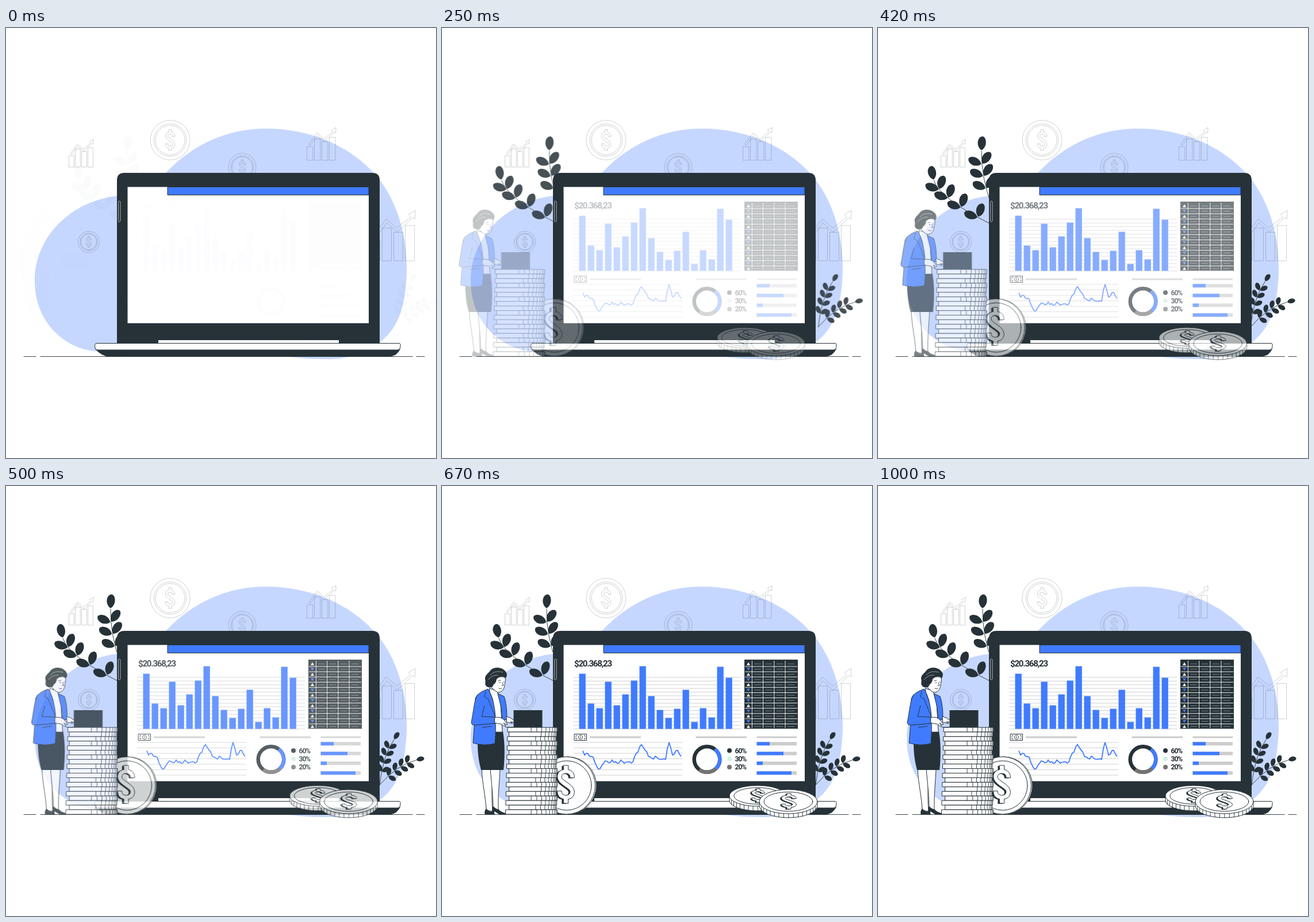
An HTML page that plays this animation: 748x748 px, repeating every 1040 ms.

```html
<!DOCTYPE html>
<html lang="en">
<head>
<meta charset="utf-8">
<title>Finance dashboard</title>
<style>
html, body { margin: 0; width: 100%; height: 100%; overflow: hidden; background: #fff; }
svg { display: block; width: 100%; height: 100%; }
text { font-family: Roboto, "Liberation Sans", sans-serif; font-weight: 700; fill: #263238; }
.dark { fill: #263238; }
.blue { fill: #407bff; }
.line { fill: #fff; stroke: #263238; stroke-width: 1; stroke-linejoin: round; stroke-linecap: round; }
.cloth { fill: #407bff; stroke: #263238; stroke-width: 1; stroke-linejoin: round; }
.thin { fill: none; stroke: #263238; stroke-width: .9; stroke-linecap: round; }
.grid { fill: none; stroke: #c4c4c4; stroke-width: .8; }
#icons { fill: none; stroke: #263238; stroke-opacity: .28; stroke-width: .8; }
#plants, #panel, #front { opacity: 0; }
#sign, #chart { vector-effect: non-scaling-stroke; }
</style>
</head>
<body>
<svg viewBox="0 0 748 748">
  <defs>
    <path id="sign" d="M-2.5-20H2.5V-15.5C7-14.5 9-11.5 9-7H4.5C4.5-10 3-11.5 0-11.5C-3-11.5-4.5-10-4.5-7.5C-4.5-4 9 0 9 8C9 12 6.5 15 2.5 15.5V20H-2.5V15.5C-7 14.5-9 11.5-9 7H-4.5C-4.5 10-3 11.5 0 11.5C3 11.5 4.5 10 4.5 7.5C4.5 4-9 0-9-8C-9-12-6.5-15-2.5-15.5Z"/>
    <path id="leaf" d="M0-.06C-.2-.16-.33-.44-.29-.7C-.25-.93-.1-1.06 .05-1.06C.23-1.02 .33-.76 .28-.48C.24-.28 .12-.14 0-.06Z"/>
    <path id="chart" d="M0 0V-1.8H.8V0ZM1 0V-2.85H1.8V0ZM2 0V-2.48H2.8V0ZM3 0V-3.07H3.8V0ZM.25-2.15L1.35-3.65L2.27-2.85L3.45-3.8L3.3-4.05L3.88-4.38L3.85-3.65L3.65-3.75L2.3-2.5L1.4-3.3L.4-1.95Z"/>
  </defs>

  <path fill="#c6d7ff" d="M452 175C530 175 600 205 646 259C685 307 698 370 697 425C695 480 685 520 650 547C625 567 595 576 560 576C500 576 450 566 380 562C300 556 230 564 165 563C106 562 50 515 50 440C50 365 110 302 193 292C230 287 250 275 278 252C325 202 385 175 452 175Z"/>
  <g id="icons"></g>
  <path class="thin" d="M31 571.5H52M60 571.5H707M714 571.5H728"/>
  <g id="plants" class="dark"></g>

  <g id="laptop">
    <path class="dark" d="M193 549V265Q193 252 206 252H637Q650 252 650 265V549Z"/>
    <path fill="#fff" d="M211.500 276.500H631V513.500H211.500ZM265 543H579V548.500H265Z"/>
    <path class="cloth" d="M281 276.500H631V290.500H281Z"/>
    <rect x="195.500" y="301" width="3.500" height="36" rx="1.700" fill="none" stroke="#ccc" stroke-width=".8"/>
    <path class="dark" d="M155 558H686Q681 570 667 572H180Q166 571 155 558Z"/>
    <path class="line" d="M157 548.500H684Q686.500 548.500 686 553Q686 560 681 560H160Q154.500 560 154.500 553Q154.500 548.500 157 548.500Z"/>
  </g>

  <g id="panel">
    <text x="230" y="313.500" font-size="15" letter-spacing="-1.200">$20.368,23</text>
    <g id="bars"></g>
    <g id="table"></g>
    <g id="trend"></g>
    <g fill="none" stroke-width="6.500">
      <circle cx="461" cy="475.500" r="22.300" stroke="#263238"/>
      <path stroke="#407bff" d="M474.500 457.800A22.300 22.300 0 0 1 476 492"/>
      <path stroke="#737373" d="M476 492A22.300 22.300 0 0 1 447.500 493.300"/>
    </g>
    <g id="legend" font-size="12"></g>
    <g id="progress"></g>
    <path class="line" d="M230.500 431.500H251.500V442.500H230.500Z"/>
    <path class="thin" d="M233 436V434H235M247 434H249V436M249 438V440H247M235 440H233V438M241 435.500V438.500"/>
    <ellipse class="thin" cx="241" cy="437" rx="3.500" ry="3.800"/>
    <path stroke="#ccc" stroke-width="2.800" d="M257 437H346M441.500 437H530M547.500 437H617"/>
  </g>

  <g id="front">
    <g id="bigCoin"></g>
    <g id="stack"></g>
    <g id="flatCoins"></g>
    <g id="woman">
      <path class="line" d="M69 492C70 518 76 540 77 564L88 566C86 542 87 518 89 492Z"/>
      <path class="line" d="M84 492C86 518 89 540 89 562L98 564C97 542 100 515 101 492Z"/>
      <path class="dark" d="M74.500 571.500Q73 565 77 561Q83 568 87 566L93 571.500ZM87.500 571.500Q86 562 89 557Q95 563 98 562Q102 567 110 569V571.500H100L91 566V571.500Z"/>
      <path class="dark" d="M62 448L90 427H106C110 450 109 475 107 494H68C64 480 62 465 62 448Z"/>
      <path class="line" d="M83 352L96 357L102 378L105 428H88Z"/>
      <path class="cloth" d="M97 361L108 366C112 377 113 392 113 406L105 407Q104 384 97 361Z"/>
      <path class="cloth" d="M80 353C70 357 61 361 58 370L56 420L54 447Q72 453 92 448C94 430 93 410 93 403C92 385 88 365 80 353Z"/>
      <path class="cloth" d="M62 363C56 372 55 391 51 411Q51 416 57 416L92 413V402L69 401L74 382"/>
      <path class="thin" d="M76 357L74 367L80 370L92 400M89 374L84 361M70 420L86 418"/>
      <path class="line" d="M92 403C99 401 104 403 108 407L114 415Q111 416 107 412L111 418Q108 419 103 414Q98 414 92 412Z"/>
      <path class="line" d="M112 401Q119 402 126 408L127 411L119 410L123 413L113 411Z"/>
      <path class="line" d="M86 332H110C111 339 109 344 109 347C108 353 105 358 99 359C94 359 90 354 87 351Z"/>
      <path class="dark" d="M80 350C72 346 77 341 75 336C74 329 81 326 84 321C90 314 103 315 109 321C115 326 113 332 110 335C106 328 99 332 95 336Q94 343 90 345Q88 352 80 350Z"/>
      <path class="thin" d="M100 342H102M107 341H108M105 342L107 347H104M99 352Q102 354 104 352M98 339L102 338"/>
      <path fill="none" stroke="#fff" stroke-width=".5" d="M84 329Q91 320 106 324M80 337Q88 328 98 329"/>
    </g>
    <path class="dark" d="M124.500 390H174.500V419H124.500Z"/>
    <path class="thin" d="M111 419.500H174"/>
  </g>
</svg>

<script>
const el = id => document.getElementById(id);
const fill = (id, html) => { el(id).innerHTML = html; };
const times = (n, fn) => Array.from({ length: n }, (_, i) => fn(i)).join('');
const rect = (x, y, w, h, attrs) => `<rect x="${x}" y="${y}" width="${w}" height="${h}" ${attrs}/>`;
const path = (d, attrs) => `<path d="${d}" ${attrs}/>`;
const ellipse = (x, y, rx, ry, attrs = '') =>
  `<ellipse cx="${x}" cy="${y}" rx="${rx}" ry="${ry}" ${attrs}/>`;
const use = (id, x, y, sx, sy = sx, attrs = '', turn = 0) =>
  `<use href="#${id}" transform="translate(${x} ${y}) rotate(${turn}) scale(${sx} ${sy})" ${attrs}/>`;

// Outline icons
const ring = (x, y, r) =>
  [1, .82, .74].map(k => ellipse(x, y, r * k, r * k)).join('') + use('sign', x, y, r / 38);
fill('icons',
  ring(285.5, 195, 34.5) + ring(411, 242, 24) + ring(144, 372, 18.5) +
  use('chart', 109.5, 242, 11) + use('chart', 523.5, 230, 13) + use('chart', 634.5, 405, 20));

// A stem from tip to root with a leaf on its end and leaf pairs at fixed angles
function branch(tip, bend, root, size, [end, left, right], pairs, gap) {
  const at = t => [0, 1].map(k => tip[k] * (1 - t) ** 2 + 2 * bend[k] * t * (1 - t) + root[k] * t * t);
  const leaf = (t, angle) => use('leaf', ...at(t), size, size, '', angle);
  return path(`M${tip}Q${bend} ${root}`, 'class="thin"') + leaf(0, end) +
    times(pairs, i => leaf(.25 + i * gap, left) + leaf(.25 + i * gap, right));
}
fill('plants',
  branch([182, 214], [181, 260], [200, 310], 24, [2, -68, 33], 3, .22) +
  branch([99, 265], [108, 296], [196, 340], 24, [-13, -72, 16], 4, .21) +
  branch([675, 441], [655, 470], [650, 520], 14, [32, -25, 62], 4, .17) +
  branch([713, 477], [680, 485], [650, 520], 14, [75, 10, 115], 4, .17));

// Dashboard
const heights = [96, 44, 36, 82, 41, 60, 84, 109, 57, 33, 19, 35, 68, 12, 36, 20, 108, 89];
fill('bars',
  times(15, i => path(`M228 ${332.8 + i * 6.42}H520`, 'class="grid"')) +
  heights.map((h, i) => rect(238.5 + i * 15, 422.5 - h, 11.3, h, 'class="blue"')).join(''));

fill('table', rect(526, 302, 93, 120.5, 'class="dark"') +
  times(13, i => {
    const y = 309.5 + i * 9.08;
    const up = i % 2 ? -1 : 1;
    return path(`M530 ${y + 2.3 * up}h6l-3 ${-5 * up}Z`, `fill="${up > 0 ? '#fff' : '#407bff'}"`) +
      path(`M527 ${y + 4.5}H618`, 'stroke="#fff" stroke-width=".9"') +
      times(4, c => path(`M${543 + c * 19.3} ${y}h12`, 'stroke="#8b9295" stroke-width=".8"'));
  }) +
  times(4, c => path(`M${539.4 + c * 19.2} 304V421`, 'stroke="#fff" stroke-width=".9"')));

let seed = 7;
const random = () => (seed = seed * 16807 % 2147483647) / 2147483647;
const keys = [[245, 464], [262, 471], [273, 494], [281, 480], [331, 479], [346, 451],
  [362, 471], [388, 477], [395, 447], [401, 467], [408, 459], [416, 472]];
function level(x) {
  const i = Math.max(1, keys.findIndex(k => k[0] >= x));
  const [[x0, y0], [x1, y1]] = [keys[i - 1], keys[i]];
  return y0 + (y1 - y0) * (x - x0) / (x1 - x0);
}
const trend = times(58, i => `${245 + i * 3},${level(245 + i * 3) + (random() - .5) * 7} `);
fill('trend',
  times(7, i => path(`M228 ${446 + i * 9.5}H418`, 'class="grid"')) +
  `<polyline points="${trend}" fill="none" stroke="#407bff" stroke-width="1.8" stroke-linejoin="round"/>`);

fill('legend', [['60%', '#263238'], ['30%', '#d3efe0'], ['20%', '#737373']].map(([label, color], i) =>
  ellipse(500, 460.3 + i * 14.3, 4, 4, `fill="${color}"`) +
  `<text x="509.5" y="${464.7 + i * 14.3}" letter-spacing="-1">${label}</text>`).join(''));

fill('progress', [22.5, 46.5, 10.5, 60.5].map((done, i) => {
  const y = 445.3 + i * 17;
  return rect(547.5, y, 69.5, 6, 'fill="#ccc"') + rect(547.5, y, done, 6, 'class="blue"');
}).join(''));

// Coins
const raised = (x, y, sx, sy, shift) =>
  use('sign', x - shift, y + shift / 3, sx, sy, 'class="dark"') + use('sign', x, y, sx, sy, 'class="line"');

fill('bigCoin',
  ellipse(218.5, 521, 50, 50, 'class="line"') + ellipse(216.5, 521, 50, 50, 'class="line"') +
  ellipse(217, 521, 43, 43, 'class="line"') + raised(215.5, 519, 1.65, 1.65, 3));

fill('stack', times(19, i => {
  const h = 7.95, y = 420 + i * h;
  const x = i % 2 ? 117 : 114.5 - i * .2;
  const right = 200.5 - i % 3;
  return rect(x, y, right - x, h, 'class="line"') +
    times(8 - i * 5 % 3, m => path(`M${right - 2 - 2 * m - m * m * .6} ${y}v${h}`, 'class="thin"'));
}));

function flatCoin(x, y, rx, ry, depth, size) {
  const edge = times(15, i => {
    const a = (.12 + i * .054) * Math.PI;
    return path(`M${x + rx * Math.cos(a)} ${y + ry * Math.sin(a)}v${depth}`, 'class="thin"');
  });
  return path(`M${x - rx} ${y}v${depth}A${rx} ${ry} 0 0 0 ${x + rx} ${y + depth}v${-depth}Z`, 'class="line"') + edge +
    ellipse(x, y, rx, ry, 'class="line"') + ellipse(x, y, rx * .84, ry * .8, 'class="line"') +
    raised(x + 1, y - .5, size * 2.1, size, 2.5);
}
fill('flatCoins', flatCoin(549, 539, 49, 18, 8, .6) + flatCoin(602.5, 549, 50.5, 21, 7, .68));

// cubic-bezier(.36, -.01, .5, 1.38)
const curve = (u, a, b) => 3 * a * u * (1 - u) ** 2 + 3 * b * u * u * (1 - u) + u ** 3;
function ease(x) {
  if (x >= 1) return 1;
  let lo = 0, hi = 1;
  for (let i = 0; i < 24; i++) {
    const mid = (lo + hi) / 2;
    if (curve(mid, .36, .5) < x) lo = mid; else hi = mid;
  }
  return curve(lo, -.01, 1.38);
}

const LOOP = 1040, STEPS = 25, SLIDE = 30;
function pose(id, p, from) {
  el(id).style.opacity = Math.max(0, Math.min(1, p));
  el(id).setAttribute('transform', `translate(${from * (1 - p)} 0)`);
}
function draw(ms) {
  const step = Math.floor(((ms + 4) % LOOP) / LOOP * STEPS) + 1;
  const slow = ease(step / STEPS);
  pose('plants', ease(step / STEPS * 2), SLIDE);
  pose('panel', slow, 0);
  pose('front', slow, -SLIDE);
}

const start = performance.now();
function tick() {
  draw(performance.now() - start);
  requestAnimationFrame(tick);
}
tick();
</script>
</body>
</html>
```
